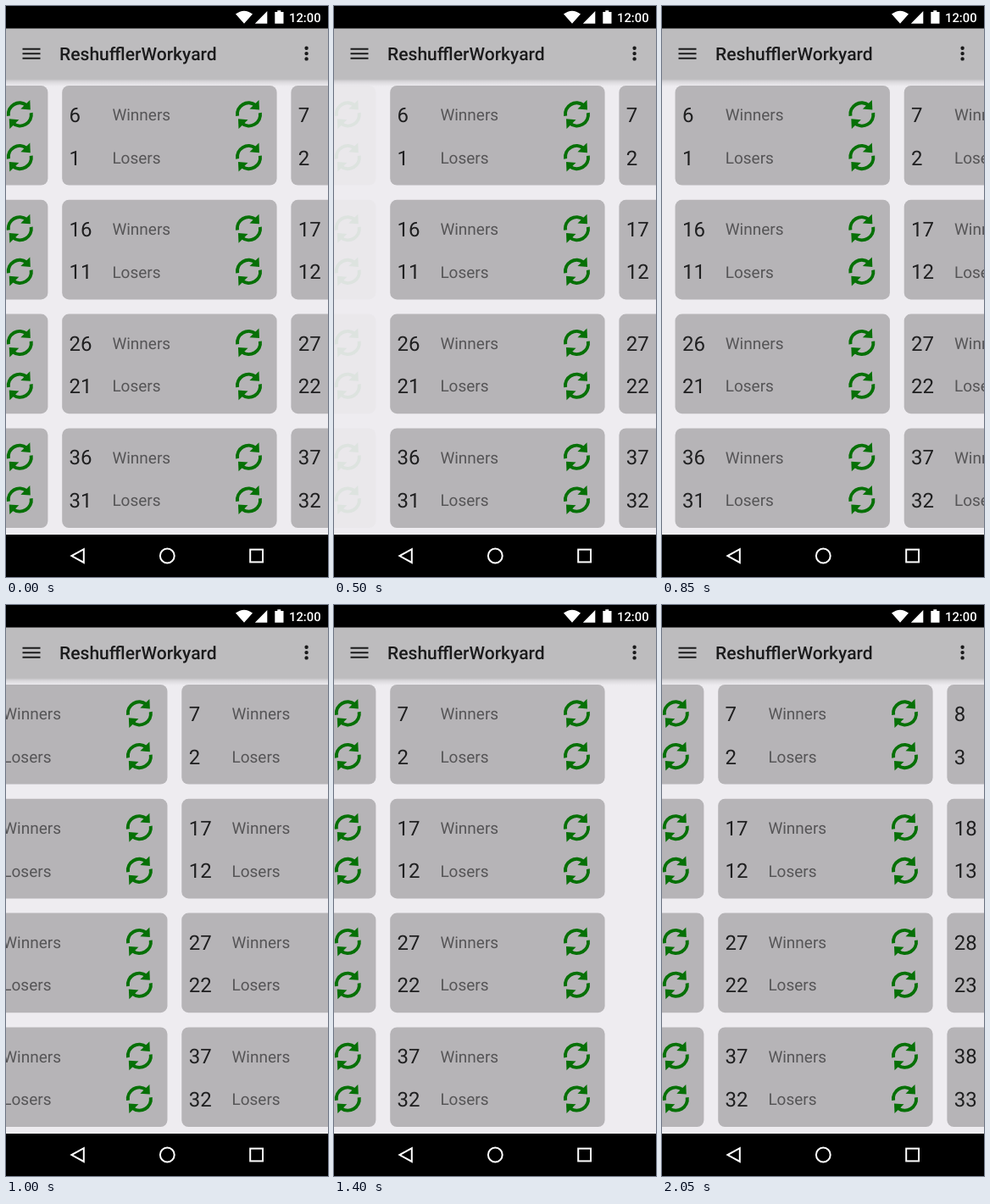
Write an HTML page that moves like this. It is 380 by 674 pixels and loops after 4100 ms.

```html
<!DOCTYPE html>
<html lang="en">
<head>
<meta charset="utf-8">
<title>Sliding cards</title>
<style>
  html, body { margin: 0; width: 100%; height: 100%; overflow: hidden; background: #eeecf0; }
  svg { display: block; width: 380px; height: 674px; font-family: Roboto, sans-serif; text-rendering: geometricPrecision; }
  .card { fill: #b6b4b7; }
  .number { font-size: 24px; fill: #1f1f20; }
  .label { font-size: 19px; fill: #565557; }
  .title { font-size: 21.1px; font-weight: 500; fill: #1b1b1c; }
  .clock { font-size: 14.8px; font-weight: 500; fill: #fff; }
  .nav { fill: none; stroke: #fff; stroke-width: 2; }
</style>
</head>
<body>
<svg viewBox="0 0 380 674">
  <defs>
    <g id="half">
      <path d="M-13.4 1.8A13.4 13.4 0 0 1 8 -10.8" fill="none" stroke="#067006" stroke-width="4"/>
      <path d="M12 -17L12.5 -5.4L1 -6.3Z" fill="#067006"/>
    </g>
    <g id="refresh">
      <use href="#half"/>
      <use href="#half" transform="rotate(180)"/>
    </g>
    <linearGradient id="shadow" x2="0" y2="1">
      <stop offset="0" stop-color="#000" stop-opacity=".2"/>
      <stop offset=".4" stop-color="#000" stop-opacity=".08"/>
      <stop offset="1" stop-color="#000" stop-opacity="0"/>
    </linearGradient>
  </defs>
  <rect width="380" height="674" fill="#eeecf0"/>
  <g id="columns"></g>

  <rect y="86" width="380" height="9" fill="url(#shadow)"/>
  <rect y="26" width="380" height="60.5" fill="#bdbcbe"/>
  <path d="M19.5 50.7H40.5M19.5 56.2H40.5M19.5 61.7H40.5" stroke="#1b1b1c" stroke-width="2"/>
  <text class="title" x="63" y="64.2">ReshufflerWorkyard</text>
  <g fill="#1b1b1c">
    <circle cx="354.6" cy="49.8" r="2.2"/>
    <circle cx="354.6" cy="56.1" r="2.2"/>
    <circle cx="354.6" cy="62.4" r="2.2"/>
  </g>

  <rect width="380" height="26.5" fill="#000"/>
  <path d="M271 9.6Q281 1.8 291 9.6L281 20.8ZM308.3 6V20.8H293.8ZM317.3 7H320.3V5.2H324.3V7H327.5V20.8H317.3Z" fill="#fff"/>
  <text class="clock" x="334" y="19.2">12:00</text>

  <rect y="624" width="380" height="50" fill="#000"/>
  <g class="nav">
    <path d="M91.8 641.2V657L77.4 649.1Z"/>
    <circle cx="190.3" cy="649" r="8.4"/>
    <rect x="288.2" y="641.6" width="14.8" height="14.8"/>
  </g>
</svg>
<script>
  const LOOP = 4100, STEP = 50;
  const PITCH = 270.2, FIRST_X = -204, FIRST_Y = 94, ROW_PITCH = 134.8;

  const line = (number, label, y) => `
    <text class="number" x="8.4" y="${y + 8.6}">${number}</text>
    <text class="label" x="59.2" y="${y + 6.8}">${label}</text>
    <use href="#refresh" x="220.3" y="${y - 0.5}"/>`;

  const card = (column, row) => `
    <g transform="translate(0 ${FIRST_Y + row * ROW_PITCH})">
      <rect class="card" width="253.4" height="117.6" rx="8"/>
      ${line(row * 10 + column + 5, "Winners", 34.4)}
      ${line(row * 10 + column, "Losers", 85.1)}
    </g>`;

  const holder = document.getElementById("columns");
  holder.innerHTML = [0, 1, 2, 3]
    .map(column => `<g>${[0, 1, 2, 3].map(row => card(column, row)).join("")}</g>`)
    .join("");
  const columns = [...holder.children];

  // Cosine ease in and out over a time span.
  const ease = (time, start, duration) => {
    const p = Math.min(1, Math.max(0, (time - start) / duration));
    return (1 - Math.cos(Math.PI * p)) / 2;
  };

  const place = (column, slot, opacity = 1) => {
    columns[column].setAttribute("transform", `translate(${FIRST_X + slot * PITCH} 0)`);
    columns[column].setAttribute("opacity", opacity);
  };

  function draw(time) {
    const moved = ease(time, 637, 747);
    place(0, 0, 1 - ease(time, 0, 600));
    place(1, 1 - moved);
    place(2, 2 - moved);
    place(3, 2, ease(time, 1400, 600));
  }

  const start = performance.now();
  function tick() {
    const elapsed = (performance.now() - start) % LOOP;
    draw(Math.floor(elapsed / STEP) * STEP);
    requestAnimationFrame(tick);
  }
  tick();
</script>
</body>
</html>
```
